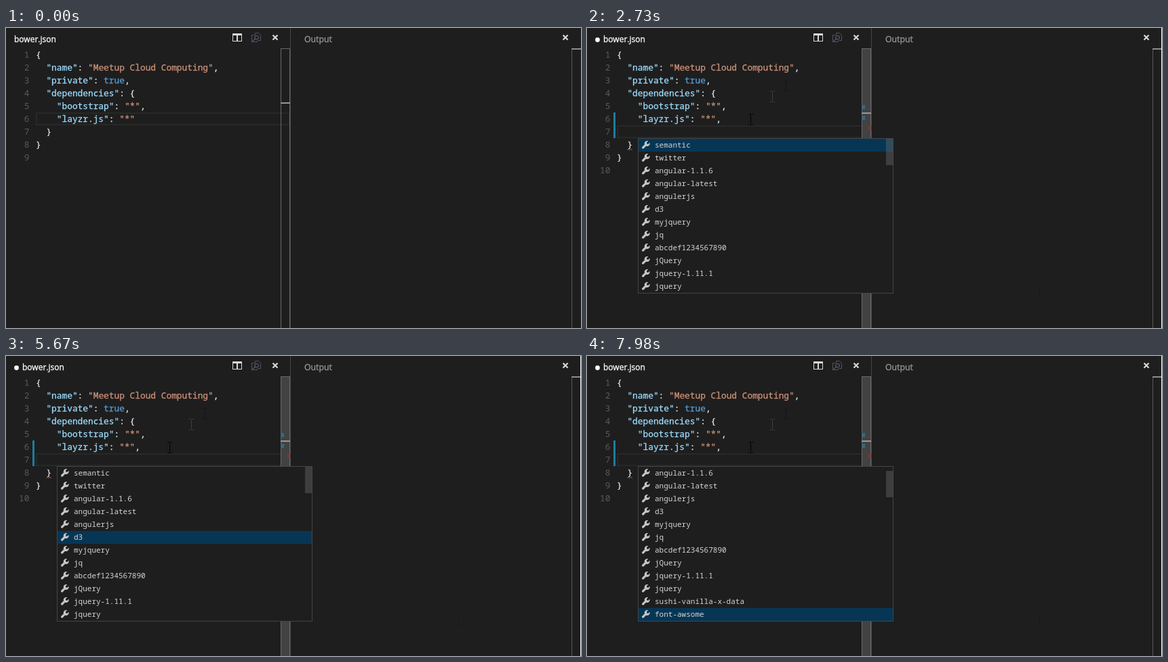
These frames come from a looping animation (848x444 px, 8000 ms). An HTML page:

```html
<!DOCTYPE html>
<html lang="en">
<head>
<meta charset="utf-8">
<title>Editor completion list</title>
<style>
  html, body { margin: 0; width: 100%; height: 100%; overflow: hidden; background: #1e1e1e; }
  svg { display: block; width: 848px; height: 444px; }
  text { white-space: pre; fill: currentColor; }
  tspan { fill: currentColor; stroke: currentColor; }
  .code { font: 12.83px "Noto Sans Mono", monospace; color: #e2e2e2; stroke: currentColor; stroke-width: .3; }
  .item { font: 11px "Noto Sans Mono", monospace; color: #d4d4d4; }
  .title { font: 12px "Open Sans", sans-serif; color: #fff; stroke: currentColor; stroke-width: .3; }
  .output { font-size: 12.3px; color: #999; }
  .num { color: #5a5a5a; text-anchor: end; stroke: none; }
  .key { color: #9cdcfe; }
  .str { color: #ce9178; }
  .bool { color: #569cd6; }
</style>
</head>
<body>
<svg id="stage" viewBox="0 0 848 444"></svg>
<script>
const LOOP = 8000, TICK = 70, LINE = 19, CHAR = 7.7, LEFT = 44, TOP = 30, ROWS = 12;
const ENTRY = 210, CLICK = 1020, COMMA = 1820, ENTER = 2240, MARKS = 2310, POPUP = 2660;
const BLINK = 450, BLINK_ORIGIN = 2988;

const LINES = [
  '{',
  '  "name": "Meetup Cloud Computing",',
  '  "private": true,',
  '  "dependencies": {',
  '    "bootstrap": "*",',
  '    "layzr.js": "*"',
  '  }',
  '}',
  ''
];
const ITEMS = ['semantic', 'twitter', 'angular-1.1.6', 'angular-latest', 'angulerjs', 'd3',
  'myjquery', 'jq', 'abcdef1234567890', 'jQuery', 'jquery-1.11.1', 'jquery',
  'sushi-vanilla-x-data', 'font-awsome'];

// Key points: [time in ms, value...]
const POINTER = [[ENTRY, 840, 440], [350, 667, 390], [490, 426, 170],
  [630, 293, 85], [700, 273, 101], [840, 241, 135]];
const SELECTION = [[3440, 0], [3855, 1], [4690, 3], [5670, 5], [6510, 6], [7560, 12], [7980, 13]];

function along(points, t) {
  const next = points.findIndex(([time]) => time > t);
  if (next < 1) return points.at(next).slice(1);
  const [from, to] = points.slice(next - 1, next + 1);
  const k = (t - from[0]) / (to[0] - from[0]);
  return from.slice(1).map((v, i) => v + (to[i + 1] - v) * k);
}

function caretOn(t) {
  if (t < COMMA) return t >= CLICK && t < CLICK + BLINK;
  if (t <= POPUP) return true;
  return Math.floor((t - BLINK_ORIGIN) / BLINK) % 2 === 0;
}

const rect = (x, y, w, h, fill, more = '') =>
  `<rect x="${x}" y="${y}" width="${w}" height="${h}" fill="${fill}" ${more}/>`;
const frame = (x, y, w, h, color, fill = 'none', width = 1) =>
  rect(x + width / 2, y + width / 2, w - width, h - width, fill, `stroke="${color}" stroke-width="${width}"`);
const path = (d, color, width = 1) =>
  `<path d="${d}" fill="none" stroke="${color}" stroke-width="${width}"/>`;
const text = (x, y, cls, body) => `<text x="${x}" y="${y}" class="${cls}">${body}</text>`;

const highlight = line => line.replace(/"[^"]*"(:?)|true/g, (word, colon) => {
  if (word === 'true') return '<tspan class="bool">true</tspan>';
  const body = colon ? word.slice(0, -1) : word;
  return `<tspan class="${colon ? 'key' : 'str'}">${body}</tspan>${colon}`;
});

const cross = (x, y) => path(`M${x} ${y}l7 7m0 -7l-7 7`, '#d8d8d8', 2.2);

const wrench = (x, y) => `<g transform="translate(${x} ${y})">` +
  path('M2 10.2L6.5 5.7', '#c5c5c5', 3.2) +
  '<circle cx="2.1" cy="10.1" r="1.7" fill="#c5c5c5"/>' +
  '<path d="M9.8 .3A4 4 0 1 0 12 2.7L9.6 4.9L7.8 4.3L7.4 2.6Z" fill="#c5c5c5"/></g>';

const beam = (x, y, color) =>
  path(`M${x - 3} ${y - 7.5}h2.5l1 1l1 -1h2.5M${x + .5} ${y - 6.5}v14M${x - 3} ${y + 8.5}h2.5l1 -1l1 1h2.5`, color);

function header(dirty) {
  return (dirty ? '<circle cx="15.5" cy="17.5" r="3.4" fill="#fff"/>' : '') +
    text(dirty ? 24 : 12, 21, 'title', 'bower.json') +
    frame(334, 8, 14, 12, '#d8d8d8') + rect(334, 8, 14, 3, '#d8d8d8') + rect(340, 8, 2, 12, '#d8d8d8') +
    path('M367.5 10.5v-3h5l3 3v8h-4M366.5 10.5h-4v10h8v-2', '#55555a') +
    '<circle cx="369.5" cy="14" r="2.7" fill="none" stroke="#4b5570" stroke-width="1.3"/>' +
    path('M367.5 16L363.5 20', '#4b5570', 1.6) +
    cross(393.5, 10.5) + cross(821.5, 10.5) +
    text(440, 21, 'title output', 'Output');
}

function rulers(t) {
  const slider = Math.min(1, Math.max(0, (t - 490) / 210));
  return rect(405, 30, 14, 414, '#424242', `opacity="${slider}"`) +
    frame(405, 30, 14, 415, '#696969') +
    rect(419, 0, 1, 444, '#444') +
    rect(405, t >= ENTER ? 125 : 110, 14, 2, '#999') +
    (t >= MARKS ? rect(405, 114, 5, 6, '#366a7b') + rect(405, 130, 5, 6, '#366a7b') : '') +
    (t >= POPUP ? rect(415, 145, 4, 6, '#7c3939') : '') +
    rect(834, 30, 1, 414, '#5a5a5a') + rect(834, 30, 14, 2, '#87908c') +
    (t >= CLICK ? rect(847, 0, 1, 444, '#fff') : '');
}

function editor(t) {
  const lines = [...LINES];
  if (t >= COMMA) lines[5] += ',';
  if (t >= ENTER) lines.splice(6, 0, '    ');
  const row = t >= ENTER ? 6 : 5;
  const top = TOP + row * LINE;
  const caretX = Math.round(LEFT + lines[row].length * CHAR);
  const edited = (t >= COMMA) + (t >= ENTER);
  return frame(LEFT, top, 375, LINE, '#282828', 'none', 2) +
    rect(39, 125, 3, edited * LINE, '#1b7fa0') +
    lines.map((line, i) => {
      const y = TOP + i * LINE + 14;
      return text(34.5, y, 'code num', i + 1) + text(LEFT, y, 'code', highlight(line));
    }).join('') +
    (t >= POPUP ? path('M59 181l2 -2l2 2l2 -2l2 2', '#c04444') : '') +
    (caretOn(t) ? rect(caretX, top, 2, LINE, '#c0c0c0') : '');
}

// The pointer leaves faint traces where it passed.
function pointer(t) {
  if (t < ENTRY) return '';
  const [x, y] = along(POINTER, t);
  return (t > 350 ? beam(667, 390, '#191919') : '') +
    (t > 630 ? beam(293, 85, '#141414') : '') +
    (t > 700 ? beam(273, 101, '#3e3e3e') : '') +
    beam(Math.round(x), Math.round(y), '#000');
}

function popup(t) {
  if (t < POPUP) return '';
  const selected = Math.floor(along(SELECTION, t)[0]);
  const offset = Math.max(0, selected - ROWS + 1);
  return frame(75, 163, 377, 230, '#454545', '#1e1e1e') +
    rect(76, 164 + (selected - offset) * LINE, 375, LINE, '#073655') +
    ITEMS.slice(offset, offset + ROWS).map((name, i) =>
      wrench(80.5, 167 + i * LINE) + text(100, 177 + i * LINE, 'item', name)).join('') +
    rect(441, 164 + offset * 3, 10, 39, '#797979', 'opacity=".35"');
}

const stage = document.getElementById('stage');
const start = performance.now();
let shown = '';

function draw() {
  const elapsed = (performance.now() - start) % LOOP;
  const t = Math.floor(elapsed / TICK) * TICK;
  const view = rect(0, 0, 848, 444, '#1e1e1e') +
    header(t >= COMMA) + editor(t) + rulers(t) + pointer(t) + popup(t);
  if (view !== shown) stage.innerHTML = shown = view;
  requestAnimationFrame(draw);
}
draw();
</script>
</body>
</html>
```
